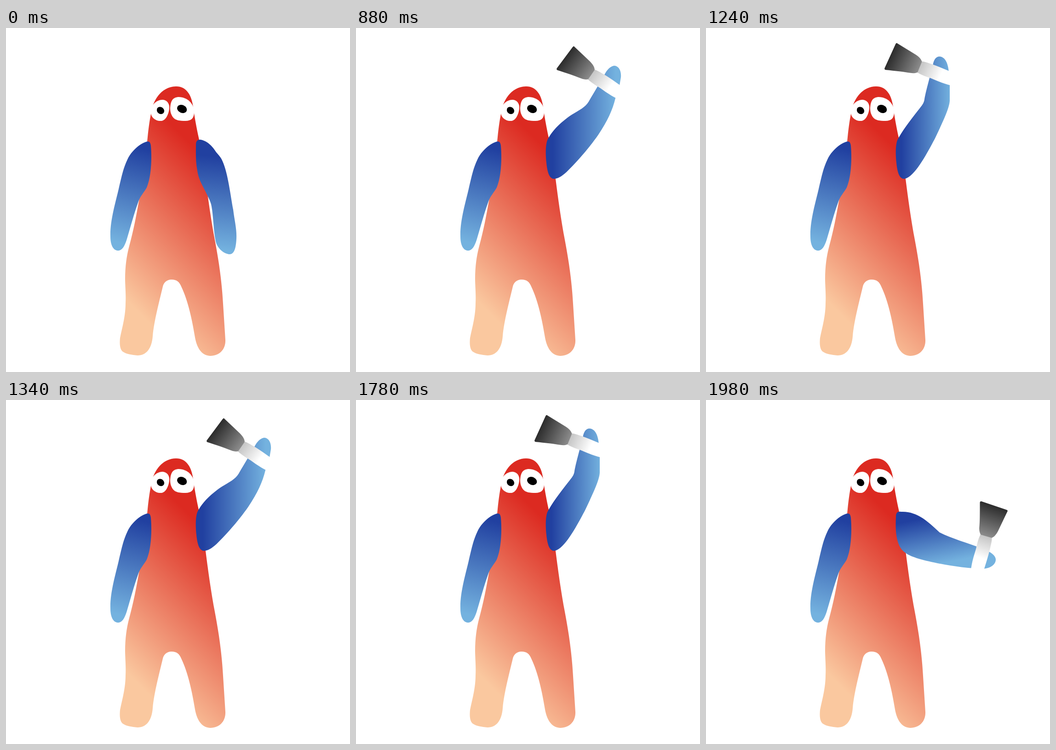
An HTML page without scripts for the animation above (2.06 s loop, 748 by 748 pixels).

```html
<!DOCTYPE html>
<html lang="en">
<head>
<meta charset="utf-8">
<title>Waving with a scraper</title>
<style>
  html, body { margin: 0; width: 100%; height: 100%; overflow: hidden; background: #fff; }
  svg { display: block; width: 100%; height: 100%; }

  /* The raised arm jumps between five held poses. */
  .pose { visibility: hidden; animation: 2.06s step-end infinite; }
  .rest { animation-name: rest; }
  .reach { animation-name: reach; }
  .wide { animation-name: wide; }
  .mid { animation-name: mid; }
  .high { animation-name: high; }

  @keyframes rest {
    0% { visibility: visible; }
    38.834%, 100% { visibility: hidden; }
  }
  @keyframes reach {
    0%, 42.718% { visibility: hidden; }
    38.834%, 96.116%, 100% { visibility: visible; }
  }
  @keyframes wide {
    0%, 47.572%, 74.757%, 96.116%, 100% { visibility: hidden; }
    42.718%, 65.048%, 91.262% { visibility: visible; }
  }
  @keyframes mid {
    0%, 52.427%, 65.048%, 79.611%, 91.262%, 100% { visibility: hidden; }
    47.572%, 60.194%, 74.757%, 86.407% { visibility: visible; }
  }
  @keyframes high {
    0%, 60.194%, 86.407%, 100% { visibility: hidden; }
    52.427%, 79.611% { visibility: visible; }
  }
</style>
</head>
<body>
<svg viewBox="0 0 748 748">
  <defs>
    <linearGradient id="skin" gradientUnits="userSpaceOnUse" x1="380" y1="230" x2="140" y2="470">
      <stop stop-color="#dc2a21"/><stop offset="1" stop-color="#fac89f"/>
    </linearGradient>

    <linearGradient id="blue" gradientUnits="userSpaceOnUse">
      <stop stop-color="#2140a0"/><stop offset="1" stop-color="#74b2df"/>
    </linearGradient>
    <linearGradient id="blue-left" href="#blue" x1="296" y1="262" x2="240" y2="465"/>
    <linearGradient id="blue-rest" href="#blue" x1="460" y1="280" x2="440" y2="480"/>
    <linearGradient id="blue-reach" href="#blue" x1="460" y1="260" x2="480" y2="362"/>
    <linearGradient id="blue-wide" href="#blue" x1="428" y1="0" x2="565" y2="0"/>
    <linearGradient id="blue-mid" href="#blue" x1="425" y1="0" x2="532" y2="0"/>
    <linearGradient id="blue-high" href="#blue" x1="425" y1="0" x2="508" y2="0"/>

    <linearGradient id="steel" gradientUnits="userSpaceOnUse" x1="-69" y1="0" x2="0" y2="0">
      <stop stop-color="#2c2c2c"/><stop offset="1" stop-color="#8c8c8c"/>
    </linearGradient>
    <linearGradient id="grip" gradientUnits="userSpaceOnUse" x1="0" y1="0" x2="48" y2="0">
      <stop stop-color="#c6c6c6"/><stop offset="1" stop-color="#fff"/>
    </linearGradient>

    <!-- Origin at the neck, handle pointing along +x -->
    <g id="scraper">
      <path fill="url(#grip)" d="M-2-13C5-16 12-16 20-17C40-19 65-19 92-20V4C70 11 50 11 33 11.5C20 13 8 14-2 12Z"/>
      <path fill="url(#steel)" d="M-69-24Q-69-28-66-27L-20-21.5C-10-20-4-17-1-13L0 12C-4 16-8 18-13 19.5C-28 23-45 29-66 36Q-69 36-69 33Z"/>
    </g>
  </defs>

  <path fill="url(#skin)" d="M369 127C390 126 402 143 406 166C409 186 413 212 420 243L434 328C438 360 444 405 453 455C461 497 469 545 472 600L477 678C478 699 464 713 444 713C424 712 415 694 411 673C405 636 396 593 381 562C377 552 371 547 360 547C349 547 343 554 341 562C334 592 322 636 319 670C317 697 305 712 286 712C274 711 260 709 253 703C247 697 247 684 248 674C252 653 260 628 260 598C261 580 259 560 259 545C259 520 262 496 268 474C277 441 283 410 289 376L307 247C309 225 312 200 316 183C319 160 336 128 369 127Z"/>

  <g fill="#fff">
    <path d="M341 156C352 157 356 167 355 175C354 186 348 201 338 202C324 203 315 193 315 184C315 168 326 156 341 156Z"/>
    <path d="M375 150C395 150 409 165 409 183C409 196 403 202 390 202C378 202 368 201 363 194C358 187 357 180 357 174C358 159 362 151 375 150Z"/>
  </g>
  <ellipse rx="8.6" ry="7.4" transform="translate(336 179.3) rotate(40)"/>
  <ellipse rx="11" ry="8.5" transform="translate(382.7 176) rotate(25)"/>

  <path fill="url(#blue-left)" d="M306 247C312 246 314 249 315 256C317 280 317 320 306 347C300 358 291 366 287 380C279 402 272 428 264 455C259 472 254 484 243 484C232 483 227 470 227 453C226 420 238 380 245 350C252 320 255 305 264 286C272 268 291 251 306 247Z"/>

  <path class="pose rest" fill="url(#blue-rest)" d="M413 254C413 245 417 242 424 243C438 246 448 256 457 270C463 277 468 282 471 290C483 317 488 364 494 395C497 420 502 437 501 458C500 480 496 492 486 492C473 491 459 478 456 464C451 440 451 410 447 388C445 376 438 365 434 356C426 340 418 327 416 310C412 290 413 270 413 254Z"/>

  <g class="pose reach">
    <path fill="url(#blue-reach)" d="M413 254C413 245 416 242 424 243C460 241 485 267 508 288C533 301 570 311 600 323C620 330 631 339 630 348C629 360 615 367 600 367C560 366 500 356 462 345C440 338 427 331 420 316C412 298 412 275 413 254Z"/>
    <use href="#scraper" transform="translate(608.5 296.5) rotate(108.7)"/>
  </g>

  <g class="pose wide">
    <path fill="url(#blue-wide)" d="M416 244C426 223 447 203 470 188C485 179 499 172 506 160C514 146 525 128 540 102C546 90 554 82 563 82C573 84 577 95 576 107L573 125L564 153C558 178 547 202 527 232C509 258 484 287 458 313C447 323 438 328 430 328C420 327 416 313 414 293C412 275 412 255 416 244Z"/>
    <use href="#scraper" transform="translate(512 102) rotate(36.7)"/>
  </g>

  <g class="pose mid">
    <path fill="url(#blue-mid)" d="M416 244C425 226 443 202 462 178C470 168 474 163 475 155C478 138 484 117 493 82C495 70 499 62 508 62C519 63 526 74 528 95L530 125V158C529 176 513 208 498 240C482 270 452 328 430 328C420 327 416 313 414 293C412 275 412 255 416 244Z"/>
    <use href="#scraper" transform="translate(465 85.5) rotate(24.5)"/>
  </g>

  <g class="pose high">
    <path fill="url(#blue-high)" d="M416 244C426 225 450 195 453 166C453 150 446 130 442 100L436 77C434 64 441 59 449 59C462 61 470 72 476 82L491 109C497 124 508 138 509 152C508 190 494 224 480 258C468 286 450 328 430 328C420 327 416 313 414 293C412 275 412 255 416 244Z"/>
    <use href="#scraper" transform="translate(411.5 92) rotate(8.3)"/>
  </g>
</svg>
</body>
</html>
```
